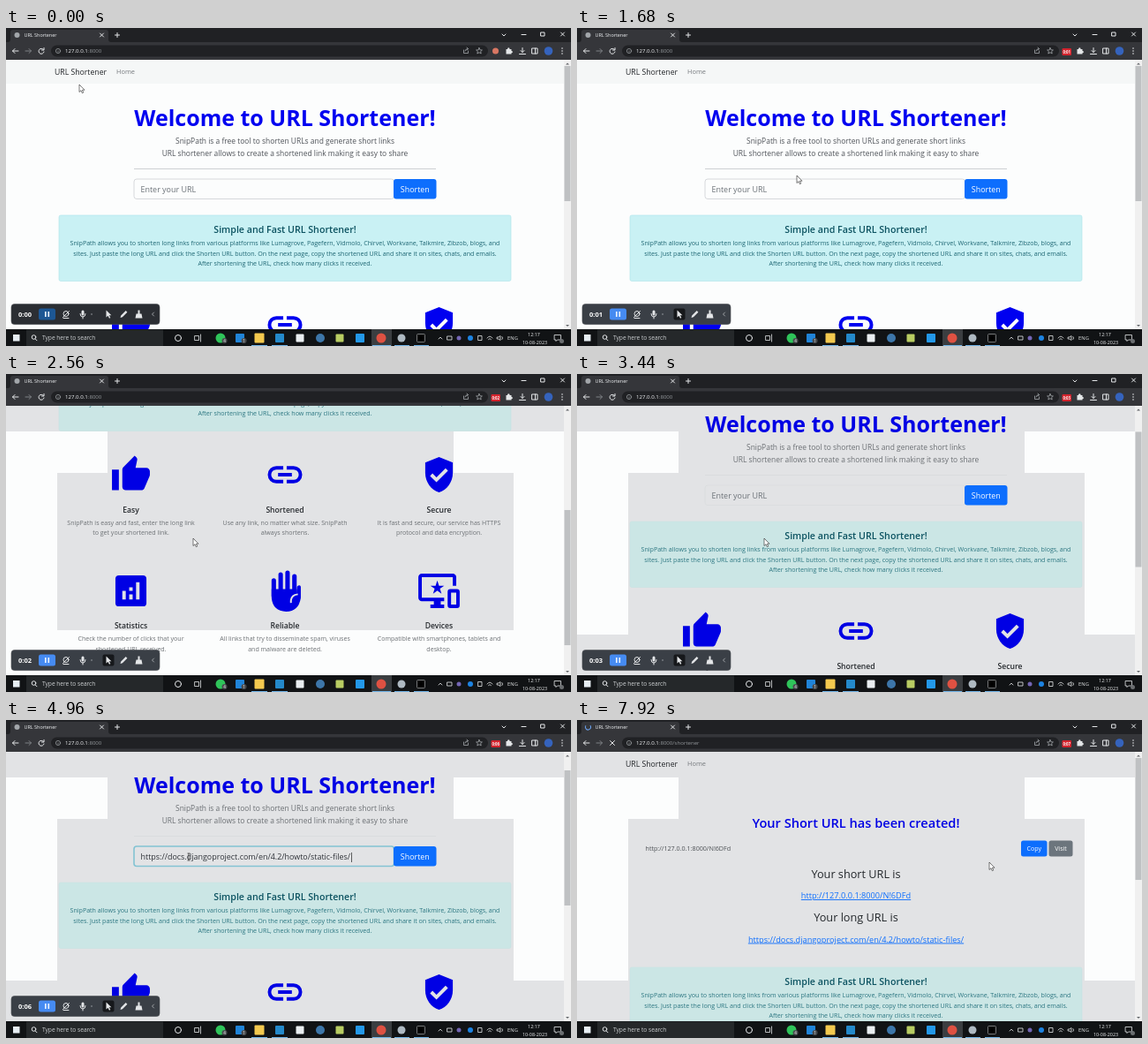
Write an HTML page that moves like this. It is 640 px wide and 360 px high and loops after 8 s.

```html
<!DOCTYPE html>
<html lang="en">
<head>
<meta charset="utf-8">
<title>URL Shortener</title>
<style>
html, body { margin: 0; width: 100%; height: 100%; overflow: hidden; background: #202124; }
svg { display: block; width: 640px; height: 360px; font-family: "Open Sans", "Noto Sans", sans-serif; }
#view { --bg: #fcfdfd; --nav: #f5f7f7; --line: #cdd0d3; --box: #c9f1f4; --edge: #aee4ea; --ink: #50545a; --note: #1d6673; --blue: #0000f0; }
#view.dim { --bg: #e2e3e5; --nav: #e2e3e5; --line: #dadcde; --box: #cbe6e5; --edge: #c6e3e2; --ink: #6c7074; --note: #2c7681; --blue: #0000e4; }
.mid { text-anchor: middle; }
.bg { fill: var(--bg); }
.ink { fill: var(--ink); }
.blue { fill: var(--blue); }
.white { fill: #fff; }
.link { fill: #0d6efd; text-decoration: underline; font-size: 9.2px; }
.stroke { fill: none; stroke: #e4e6e8; stroke-width: 1; stroke-linecap: round; stroke-linejoin: round; }
.side { fill: #fcfdfd; display: none; }
.dim .side { display: inline; }
</style>
</head>
<body>
<svg viewBox="0 0 640 360">
  <defs>
    <clipPath id="clip"><rect y="36" width="632" height="305"/></clipPath>
    <g id="nav">
      <rect y="36" width="632" height="27" fill="var(--nav)"/>
      <text x="55" y="53" font-size="8.7" fill="#222529">URL Shortener</text>
      <text x="125" y="52.4" font-size="7.4" fill="#74787c">Home</text>
    </g>
    <g id="alert" class="mid" fill="var(--note)" font-size="7.1">
      <rect x="60" y="212" width="512" height="74.5" rx="2" fill="var(--box)" stroke="var(--edge)" stroke-width=".6"/>
      <text x="316" y="231.5" font-size="10.65" font-weight="600" fill="#0b5260">Simple and Fast URL Shortener!</text>
      <text x="316" y="246.2">SnipPath allows you to shorten long links from various platforms like Lumagrove, Pagefern, Vidmolo, Chirvel, Workvane, Talkmire, Zibzob, blogs, and</text>
      <text x="316" y="257.5">sites. Just paste the long URL and click the Shorten URL button. On the next page, copy the shortened URL and share it on sites, chats, and emails.</text>
      <text x="316" y="268.8">After shortening the URL, check how many clicks it received.</text>
    </g>
  </defs>

  <g id="view" clip-path="url(#clip)">
    <rect class="bg" y="36" width="632" height="305"/>
    <path class="side" d="M0 65H115V112H58V295H0ZM632 65H507V112H575V295H632Z"/>
    <g id="floor"><path class="side" d="M0 290H632V341H0Z"/></g>

    <g id="home">
      <use href="#nav"/>
      <text class="mid blue" x="316" y="111" font-size="25" font-weight="700">Welcome to URL Shortener!</text>
      <g class="mid ink" font-size="8.45">
        <text x="316" y="131">SnipPath is a free tool to shorten URLs and generate short links</text>
        <text x="316" y="145">URL shortener allows to create a shortened link making it easy to share</text>
      </g>
      <path d="M145 159.5H487" stroke="var(--line)"/>
      <rect id="field" class="bg" x="145" y="171" width="294.5" height="22.5" rx="3"/>
      <text id="entry" x="152.5" y="186.2" font-size="8.95"></text>
      <path id="caret" d="M391.5 178V189" stroke="#222" stroke-width=".7"/>
      <rect id="button" x="439" y="171" width="48.5" height="22.5" rx="3"/>
      <text class="mid white" x="463.3" y="186.2" font-size="8.9">Shorten</text>
      <use href="#alert"/>
      <g id="cards" class="mid"></g>
    </g>

    <g id="result">
      <use href="#nav"/>
      <g class="mid">
        <text class="blue" x="316" y="122" font-size="14.6" font-weight="600">Your Short URL has been created!</text>
        <text x="316" y="178.5" font-size="12.7" fill="#23272b">Your short URL is</text>
        <text class="link" x="316" y="202">http://127.0.0.1:8000/N!6DFd</text>
        <text x="316" y="228.3" font-size="12.7" fill="#23272b">Your long URL is</text>
        <text class="link" x="316" y="251.5">https://docs.djangoproject.com/en/4.2/howto/static-files/</text>
        <rect x="503" y="136.5" width="29.5" height="18" rx="2.5" fill="#0d6efd"/>
        <rect x="534.5" y="136.5" width="27" height="18" rx="2.5" fill="#6c757d"/>
        <g class="white" font-size="7.1"><text x="517.7" y="148.2">Copy</text><text x="548" y="148.2">Visit</text></g>
      </g>
      <text x="77.5" y="148.3" font-size="7.15" fill="#4c5054">http://127.0.0.1:8000/N!6DFd</text>
      <use href="#alert" y="68"/>
    </g>
  </g>

  <!-- scrollbar -->
  <rect x="632" y="36" width="8" height="305" fill="#f0f0f0"/>
  <path d="M634 41.5l2-2 2 2zM634 336l2 2 2-2z" fill="#606468"/>
  <rect id="thumb" x="632.5" y="43" width="7" fill="#bfc1c3"/>

  <!-- browser frame -->
  <rect width="640" height="16" fill="#202124"/>
  <path d="M2 16Q5 16 5 13V5Q5 2 8 2H113Q116 2 116 5V13Q116 16 119 16H640V36H0V16Z" fill="#35363a"/>
  <circle id="globe" cx="12.5" cy="8" r="3" fill="#a2a6aa"/>
  <circle id="spin" cx="12.5" cy="8" r="3" class="stroke" stroke-dasharray="12 7"/>
  <text x="20.5" y="10" font-size="5.45" fill="#f2f4f6">URL Shortener</text>
  <path class="stroke" d="M106.500 6l4 4m0-4l-4 4M123.500 8h5m-2.500-2.500v5M562 7l2 2 2-2M584 7.500h5M628.500 5l4 4m0-4l-4 4M606 5h4v4h-4z"/>
  <path class="stroke" d="M14 26H7.500m2.500-2.500L7.500 26l2.500 2.500"/>
  <path class="stroke" style="stroke:#7d8084" d="M22 26h6.500m-2.500-2.500l2.500 2.500-2.500 2.500"/>
  <path id="reload" class="stroke"/>
  <rect x="51" y="19.5" width="495" height="13" rx="6.5" fill="#202124"/>
  <circle class="stroke" style="stroke:#a4a8ab;stroke-width:.7" cx="59" cy="26" r="2.6"/>
  <path d="M59 25.5v2" stroke="#a4a8ab" stroke-width=".7"/>
  <text x="67" y="28.3" font-size="6.1" fill="#f2f4f6">127.0.0.1<tspan id="path" fill="#92969a"></tspan></text>
  <path class="stroke" style="stroke:#a4a8ab;stroke-width:.8" d="M518.500 25v3.500h5V26M520 26q0-2.500 3.500-2.500m-1.500-1.500l1.500 1.500-1.500 1.500M536 22.500l1 2.300 2.400.2-1.800 1.600.6 2.400-2.200-1.300-2.200 1.300.6-2.400-1.800-1.600 2.400-.2z"/>
  <path class="stroke" d="M585 22.500v5m-2-2l2 2 2-2M581.500 29.500h7M596 23h6v6h-6zM599.500 23v6"/>
  <path d="M566.500 24h1.500q0-1.800 1.300-1.800t1.300 1.800h1.900v1.900q1.400 0 1.400 1.200t-1.400 1.200v1.200h-6z" fill="#e4e6e8"/>
  <circle id="ext" cx="554.5" cy="26" r="3.5" fill="#d97763"/>
  <g id="badge"><rect x="549.5" y="23" width="10.5" height="8" rx="1" fill="#d4232d"/><text id="badgeText" class="mid white" x="554.7" y="29" font-size="4.3" font-weight="700"></text></g>
  <circle cx="614.5" cy="26" r="4.8" fill="#3563bd"/>
  <g fill="#e4e6e8"><circle cx="630" cy="23" r=".8"/><circle cx="630" cy="26" r=".8"/><circle cx="630" cy="29" r=".8"/></g>

  <!-- recorder -->
  <g id="recorder">
    <rect id="panel" x="6" y="312.5" width="168" height="23" rx="3.5" stroke="#4a4d52" stroke-width=".6"/>
    <text id="timer" x="14" y="326.6" font-size="7.5" font-weight="700" fill="#fff"></text>
    <rect id="pause" x="37" y="317.5" width="19" height="13" rx="2.5"/>
    <path d="M44.800 321v6M48.300 321v6" stroke="#eaf3ff" stroke-width="1.6"/>
    <rect id="tool" x="109.5" y="317.5" width="13" height="13" rx="2" fill="#16181b"/>
    <path class="stroke" d="M64.500 327.500l7-7M65 328.500h6"/>
    <circle class="stroke" cx="68" cy="323.5" r="3"/>
    <path class="stroke" d="M84 323.500q0 3.500 3 3.500t3-3.500M87 327v2"/>
    <rect x="85.5" y="319.5" width="3" height="6" rx="1.5" fill="#e4e6e8"/>
    <circle cx="97" cy="324" r=".8" fill="#9ea2a6"/>
    <path d="M113.500 319.500v8l2-1.700 1.500 3 1.300-.7-1.500-2.800h2.600z" fill="#e4e6e8"/>
    <path d="M129.500 328l.7-2.500 5.500-5.500 1.700 1.700-5.500 5.500zM149.500 319.500h2v4h2l1 5h-8l1-5h2z" fill="#e4e6e8"/>
    <path class="stroke" style="stroke:#9ea2a6" d="M167.500 322l-2 2 2 2"/>
  </g>

  <!-- taskbar -->
  <rect y="341" width="640" height="19" fill="#111315"/>
  <rect x="8" y="347" width="7.5" height="7.5" fill="#e6edf2"/>
  <rect x="23" y="341.5" width="155" height="18.5" fill="#25282a"/>
  <circle class="stroke" cx="31.5" cy="350" r="2.3"/><path class="stroke" d="M33.200 352l1.800 1.800"/>
  <text x="41" y="353.2" font-size="6.6" fill="#cfd2d4">Type here to search</text>
  <circle class="stroke" cx="195" cy="351" r="3.5"/>
  <path class="stroke" style="stroke-width:.8" d="M214 348.500h4.500v5H214zM220.500 347v8"/>
  <rect x="414" y="341" width="23" height="19" fill="#3b3e41"/>
  <g id="apps"></g>
  <path d="M278 359.500h18M301 359.500h18M415 359.500h21M440 359.500h17M462 359.500h17" stroke="#76b9ed"/>
  <g class="white mid" font-size="4.5">
    <circle cx="247.5" cy="354" r="3" fill="#4a4d50"/><text x="247.5" y="355.7">4</text>
    <circle cx="269.5" cy="354" r="3" fill="#4a4d50"/><text x="269.5" y="355.7">1</text>
  </g>
  <path class="stroke" style="stroke-width:.8" d="M490 352l2-2 2 2M500 349h5v4h-5zM535 348.500h4v5h-4zM545 351q3-4 6 0m-4.500 1.500q1.500-2 3 0M556.500 350h1.500l2-1.500v5l-2-1.500h-1.500zM562 349.500q1.500 1.500 0 3M621.500 347.500h7v5.500h-4l-1.500 1.500V353h-1.500z"/>
  <g class="mid" fill="#eceeef" font-size="5.4">
    <text x="574" y="353" font-size="5.8">ENG</text>
    <text x="598" y="348.7">12:17</text><text x="599" y="357.8">10-08-2023</text>
  </g>
  <circle cx="629.5" cy="354.5" r="2.5" fill="#6a6d70"/>

  <g id="cursor">
    <path id="arrow" d="M0 0V8.500L2 6.700 3.300 9.700 4.700 9.100 3.400 6.200H6Z" fill="#fff" stroke="#222" stroke-width=".6"/>
    <path id="beam" d="M-1.500-4H1.500M0-4V4M-1.500 4H1.500" stroke="#222" stroke-width=".7"/>
    <path id="hand" d="M-.9 0Q0-1.300.9 0V3.200L4.200 4Q5 4.300 4.800 5.500L4 9H-.7L-3 5.500Q-3 4.500-.9 5.200Z" fill="#fff" stroke="#222" stroke-width=".6"/>
  </g>
</svg>
<script>
const $ = id => document.getElementById(id);
const show = (id, on) => { $(id).style.display = on ? "" : "none"; };
const LONG_URL = "https://docs.djangoproject.com/en/4.2/howto/static-files/";

const icons = {
  thumb: '<path d="M1 21h4V9H1v12zm22-11c0-1.100-.9-2-2-2h-6.310l.95-4.570.03-.32c0-.41-.17-.79-.44-1.060L14.170 1 7.590 7.590C7.220 7.950 7 8.450 7 9v10c0 1.100.9 2 2 2h9c.83 0 1.540-.5 1.840-1.220l3.020-7.050c.09-.23.14-.47.14-.73v-2z"/>',
  chain: '<path d="M11 8H7a4 4 0 0 0 0 8h4M13 8h4a4 4 0 0 1 0 8h-4M8 12h8" fill="none" stroke="var(--blue)" stroke-width="2"/>',
  shield: '<path d="M12 1.700L4 5v6c0 5.300 3.500 10 8 11.300 4.500-1.300 8-6 8-11.300V5z"/><path d="M7.500 12l3 3 6-6" fill="none" stroke="var(--bg)" stroke-width="2"/>',
  chart: '<rect x="3" y="3" width="18" height="18" rx="2"/><path class="bg" d="M7 12h2v5H7zM11 14h2v3h-2zM11 10h2v2h-2zM15 7h2v10h-2z"/>',
  hand: '<path d="M5.500 6v9M9.500 2.500v10M13.500 1.500v10M17.500 3.500v9" fill="none" stroke="var(--blue)" stroke-width="2.6" stroke-linecap="round"/><path d="M4.200 11H18.800V14L19 9.500Q20.500 8 21.200 9.500V16Q20 24 12.700 24 4.200 23.500 4.200 15Z"/><path d="M19.500 14Q15 14.500 15.500 19" fill="none" stroke="var(--bg)" stroke-width="1"/>',
  devices: '<path d="M22 9V4c0-1.100-.9-2-2-2H2C.9 2 0 2.900 0 4v12c0 1.100.9 2 2 2h7v2H7v2h8v-2h-2v-2h2v-2H2V4h18v5zM12 9l-1-3-1 3H7l2.470 1.760-.94 2.910L11 11.870l2.470 1.800-.94-2.910L15 9z"/><rect x="18" y="12" width="5" height="9" rx=".5" fill="none" stroke="var(--blue)" stroke-width="2"/>'
};
const cards = [
  ["thumb", "Easy", "SnipPath is easy and fast, enter the long link", "to get your shortened link."],
  ["chain", "Shortened", "Use any link, no matter what size. SnipPath", "always shortens."],
  ["shield", "Secure", "It is fast and secure, our service has HTTPS", "protocol and data encryption."],
  ["chart", "Statistics", "Check the number of clicks that your", "shortened URL received."],
  ["hand", "Reliable", "All links that try to disseminate spam, viruses", "and malware are deleted."],
  ["devices", "Devices", "Compatible with smartphones, tablets and", "desktop."]
];
$("cards").innerHTML = cards.map(([icon, title, a, b], i) => `
  <g transform="translate(${141.5 + i % 3 * 174.5} ${336 + Math.floor(i / 3) * 131.5})">
    <g class="blue" transform="scale(1.95) translate(-12 -12)">${icons[icon]}</g>
    <text y="42.7" font-size="8.6" font-weight="600" fill="#25292d">${title}</text>
    <g class="ink" font-size="7.05"><text y="56.8">${a}</text><text y="68">${b}</text></g>
  </g>`).join("");

// x, colour, size, round
const apps = [
  [243, "#2fc45a", 11, 1], [265, "#2084d8", 10], [287, "#f3c94f", 11], [310, "#2489ca", 10], [333, "#e9edf0", 9],
  [356, "#3d76a9", 10, 1], [378, "#b8cc62", 9], [401, "#2398e8", 10], [425, "#df5142", 11, 1], [448, "#aeb9c2", 9, 1],
  [470, "#000", 9], [513, "#7466b5", 5, 1], [526, "#1d83e2", 6, 1]
];
$("apps").innerHTML = apps.map(([x, c, s, round]) =>
  `<rect x="${x - s / 2}" y="${351 - s / 2}" width="${s}" height="${s}" rx="${round ? s / 2 : 1}" fill="${c}"${c == "#000" ? ' stroke="#a6a9ab" stroke-width=".7"' : ""}/>`).join("");

// eased value between [time, ...values] stops
function track(t, stops) {
  const i = stops.findIndex(s => s[0] > t);
  if (i == 0) return stops[0].slice(1);
  if (i < 0) return stops[stops.length - 1].slice(1);
  const a = stops[i - 1], b = stops[i], u = (t - a[0]) / (b[0] - a[0]), e = u * u * (3 - 2 * u);
  return a.slice(1).map((v, k) => v + (b[k + 1] - v) * e);
}
const scrolls = [[1840, 0], [2480, 222], [2720, 222], [3360, 45], [3600, 45], [3920, 28]];
const moves = [[160, 83, 64], [1600, 249, 167], [1760, 249, 167], [2080, 212, 186], [3600, 212, 186],
  [4080, 207, 155], [5280, 207, 155], [6080, 467, 161]];
const ticks = [880, 1920, 2880, 3760, 4240, 4640, 6000];

function draw(t) {
  const [scroll] = track(t, scrolls), [x, y] = track(t, moves);
  const done = t >= 7200, loading = t >= 6400, clicked = t >= 6320;
  const focus = t >= 4240 && !clicked, pasted = t >= 4560;
  const inRow = !done && y > 171 - scroll && y < 193.5 - scroll;
  const overField = inRow && x > 145 && x < 439, overButton = inRow && x >= 439 && x < 487;

  $("view").classList.toggle("dim", t >= 1920);
  show("floor", t < 2720);
  show("home", !done);
  show("result", done);
  $("home").setAttribute("transform", `translate(0 ${-scroll})`);
  $("thumb").setAttribute("y", done ? 43 : 43 + scroll / 2);
  $("thumb").setAttribute("height", done ? 138 : 153);

  $("field").style.stroke = focus ? "#83c3d3" : "var(--line)";
  $("field").style.strokeWidth = focus ? 1.6 : .8;
  $("entry").textContent = pasted ? LONG_URL : "Enter your URL";
  $("entry").style.fill = pasted ? "#30343a" : "#6c7278";
  show("caret", focus && pasted && (t - 4560) % 1000 < 500);
  $("button").style.fill = overButton ? "#0b5ed7" : "#0d6efd";
  $("button").style.stroke = clicked ? "#8bb5f0" : "none";
  $("button").style.strokeWidth = 1.8;

  const sec = ticks.filter(s => t >= s).length;
  $("timer").textContent = "0:0" + sec;
  $("badgeText").textContent = "0:0" + sec;
  show("badge", sec);
  show("ext", !sec);
  show("tool", sec);
  $("panel").style.fill = sec ? "#3a3f46" : "#2b2e33";
  $("pause").style.fill = sec ? "#468bf2" : "#1d5794";
  show("recorder", !done);

  show("globe", !loading);
  show("spin", loading);
  $("spin").style.stroke = done ? "#6ea6f5" : "#777b80";
  $("spin").setAttribute("transform", `rotate(${t * .36 * (done ? 1 : -1)} 12.5 8)`);
  $("reload").setAttribute("d", loading ? "M37.5 23.5l5 5m0-5l-5 5" : "M42.5 24.5A3 3 0 1 0 43 27M43 22.5v2.5h-2.5");
  $("path").textContent = done ? ":8000/shortener" : ":8000";

  $("cursor").setAttribute("transform", `translate(${x} ${y})`);
  show("arrow", !overField && !overButton);
  show("beam", overField);
  show("hand", overButton);
}
function loop() {
  draw(Math.floor(performance.now() % 8000 / 80) * 80);
  requestAnimationFrame(loop);
}
loop();
</script>
</body>
</html>
```
